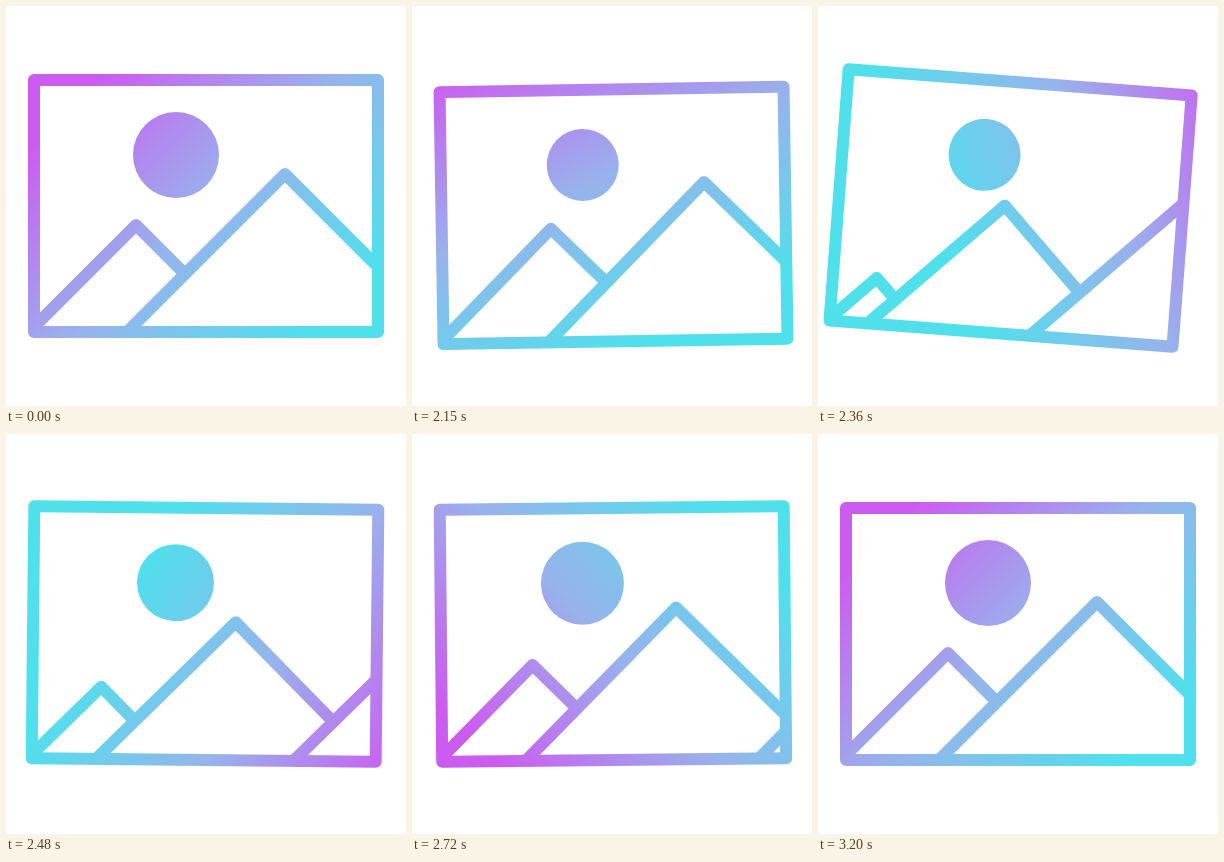
An HTML page with a canvas for the animation above (3230 ms loop, 400 px wide and 400 px high).

```html
<!DOCTYPE html>
<html lang="en">
<head>
<meta charset="utf-8">
<title>Picture icon</title>
<style>
  html, body { margin: 0; width: 100%; height: 100%; overflow: hidden; background: #fff; }
  canvas { display: block; width: 100vmin; height: 100vmin; }
</style>
</head>
<body>
<canvas id="stage" width="400" height="400"></canvas>
<script>
const ctx = document.getElementById('stage').getContext('2d');
const LOOP = 3230, START = 2030, STEP = 30;
const LEFT = 28, RIGHT = 372, TOP = 74, BOTTOM = 326;

// Smooth curve through [time, value] pairs, flat at peaks and at both ends
function track(...keys) {
  const slope = i => (keys[i + 1][1] - keys[i][1]) / (keys[i + 1][0] - keys[i][0]);
  const tangents = keys.map((_, i) => {
    if (i === 0 || i === keys.length - 1) return 0;
    const a = slope(i - 1), b = slope(i);
    return a * b > 0 ? 2 * a * b / (a + b) : 0;
  });
  return t => {
    if (t <= keys[0][0]) return keys[0][1];
    const i = keys.findIndex(k => k[0] > t) - 1;
    if (i < 0) return keys[keys.length - 1][1];
    const [t0, v0] = keys[i], [t1, v1] = keys[i + 1];
    const d = t1 - t0, u = (t - t0) / d, w = 1 - u;
    return v0 * (1 + 2 * u) * w * w + v1 * u * u * (3 - 2 * u)
      + d * u * w * (tangents[i] * w - tangents[i + 1] * u);
  };
}

const tilt = track([2000, 0], [2090, -2.2], [2310, 4.9], [2600, -1.95], [2850, 1], [3110, 0]);
const drop = track([2000, 0], [2030, 0.8], [2150, 9.4], [2190, 10.4], [2310, 4.9], [2360, 2], [2480, 0]);
const sunSize = track([2000, 43], [2030, 42.5], [2150, 36], [2240, 33.5], [2360, 36], [2480, 38.5], [2720, 41.5], [3110, 43]);
const slide = track([2000, 0], [2030, 0.004], [2150, 0.048], [2360, 0.43], [2480, 0.675], [2720, 0.895], [3110, 1]);
const rise = track([2000, 0], [2150, 0.13], [2360, 0.41], [2480, 0.61], [2720, 0.88], [3110, 1]);
const turn = track([2000, 45], [2150, 65], [2360, 157], [2480, 213], [2720, 317], [3110, 405]);
const shift = track([2000, 0], [2150, 36], [2360, 90], [2480, 73], [2720, 8], [3110, 0]);

const rad = deg => deg * Math.PI / 180;
const mix = (a, b, u) => a + (b - a) * u;

function paint(angle, offset) {
  const c = Math.cos(angle), s = Math.sin(angle), reach = 165;
  const at = d => [200 + c * d, 200 + s * d];
  const g = ctx.createLinearGradient(...at(-offset - reach), ...at(-offset + reach));
  g.addColorStop(0, '#cc5cf0');
  g.addColorStop(0.5, '#97b3ec');
  g.addColorStop(1, '#50e0ec');
  return g;
}

// Each peak grows into the next one; the last leaves on the right
function peaks(t) {
  const p = slide(t);
  return [
    [mix(28, 130, p), mix(326, 219, p)],
    [mix(130, 279, p), mix(219, 168, rise(t))],
    [mix(279, 529, p), 168]
  ];
}

function drawPeaks(list) {
  ctx.save();
  ctx.beginPath();
  ctx.rect(LEFT, TOP, RIGHT - LEFT, BOTTOM - TOP);
  ctx.clip();
  list.forEach(([x, y], i) => {
    const next = list[i + 1];
    const run = next ? Math.max(0, (next[0] + next[1] - x - y) / 2) : 400;
    const foot = 340 - y;
    ctx.beginPath();
    ctx.moveTo(x - foot, y + foot);
    ctx.lineTo(x, y);
    ctx.lineTo(x + run, y + run);
    ctx.stroke();
  });
  ctx.restore();
}

function draw(t) {
  const angle = tilt(t);
  ctx.clearRect(0, 0, 400, 400);
  ctx.save();
  ctx.translate(200 - 1.7 * angle, 200 + drop(t));
  ctx.rotate(rad(angle));
  ctx.translate(-200, -200);
  ctx.fillStyle = ctx.strokeStyle = paint(rad(turn(t) - angle), shift(t));
  ctx.lineWidth = 12;
  ctx.lineJoin = 'round';
  drawPeaks(peaks(t));
  ctx.strokeRect(LEFT, TOP, RIGHT - LEFT, BOTTOM - TOP);
  ctx.beginPath();
  ctx.arc(170, 149, sunSize(t), 0, 2 * Math.PI);
  ctx.fill();
  ctx.restore();
}

const begin = performance.now();
function tick() {
  const t = (performance.now() - begin) % LOOP;
  draw(t < START ? 0 : START + Math.floor((t - START) / STEP) * STEP);
  requestAnimationFrame(tick);
}
tick();
</script>
</body>
</html>
```
